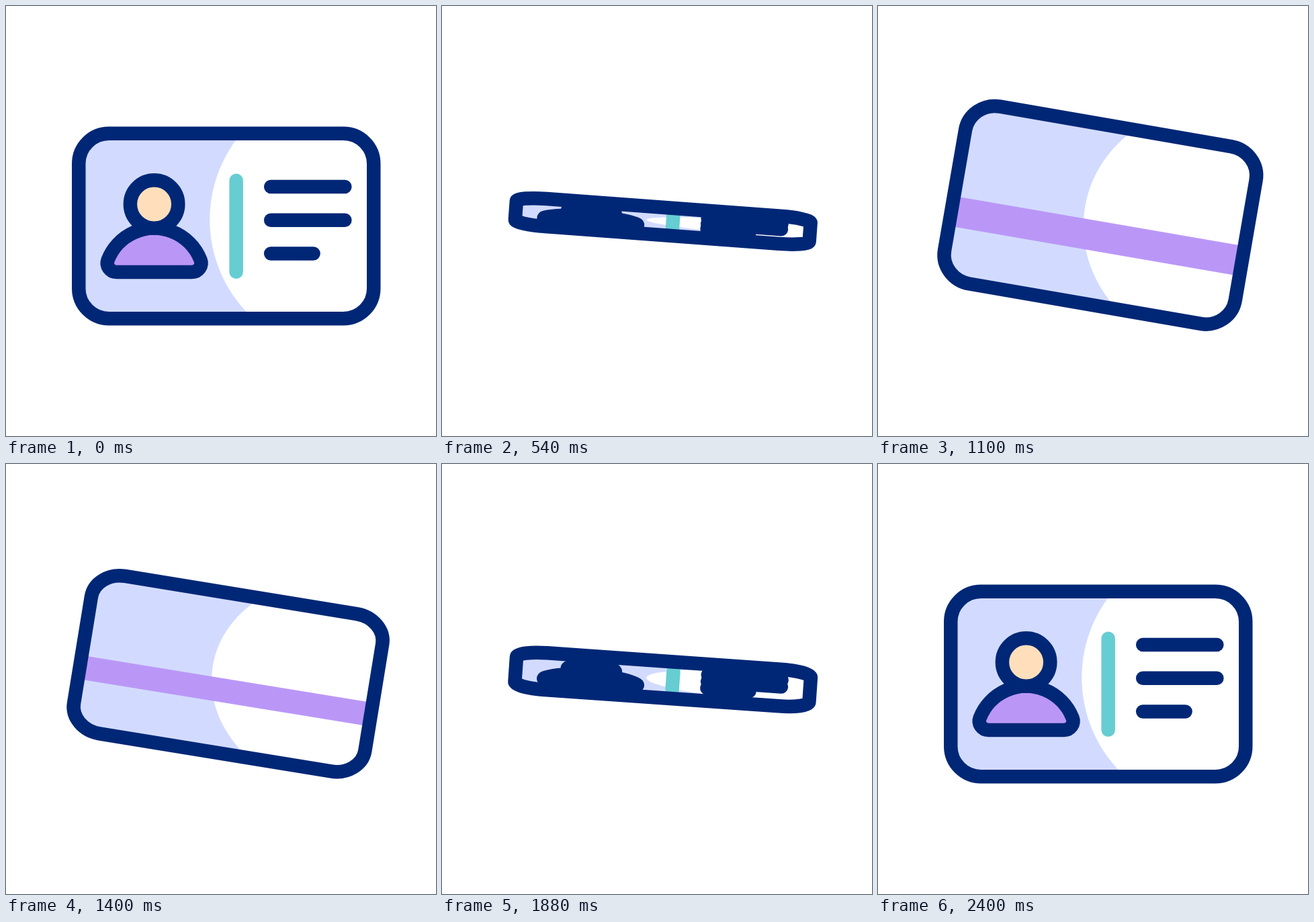
Write an HTML page with a canvas that moves like this. It is 640 px wide and 640 px high and loops after 2620 ms.

```html
<!DOCTYPE html>
<html lang="en">
<head>
<meta charset="utf-8">
<title>ID card flip</title>
<style>
  html, body { margin: 0; width: 100%; height: 100%; overflow: hidden; background: #fff; }
  canvas { display: block; }
</style>
</head>
<body>
<canvas id="stage" width="640" height="640"></canvas>
<script>
const ctx = document.getElementById('stage').getContext('2d');

const NAVY = '#002776', LAVENDER = '#d2dbff', PURPLE = '#ba97f7',
      TEAL = '#66cdd3', SKIN = '#ffdfbb';
const LOOP = 2620, HALF = 1200, STEP = 20;
const LINE = 20.5;
const CARD = { x: 327.75, y: 327.5, width: 439, front: 275.5, back: 278.7, radius: 45 };
const PIVOT = { x: 423.7, y: 337.5 };
const MAX_TILT = 10 * Math.PI / 180;

const smooth = p => p * p * (3 - 2 * p);

// Builds a path squashed vertically; strokes stay at full width.
function squashed(scale, build) {
  ctx.save();
  ctx.scale(1, scale);
  ctx.beginPath();
  build();
  ctx.restore();
}

function stroke(color = NAVY) {
  ctx.strokeStyle = color;
  ctx.stroke();
}

function fill(color) {
  ctx.fillStyle = color;
  ctx.fill();
}

function line(scale, x1, y1, x2, y2, color) {
  squashed(scale, () => {
    ctx.moveTo(x1, y1);
    ctx.lineTo(x2, y2);
  });
  stroke(color);
}

function cardPath(scale, height) {
  squashed(scale, () =>
    ctx.roundRect(-CARD.width / 2, -height / 2, CARD.width, height, CARD.radius));
}

function paintInside(circleScale) {
  ctx.fillStyle = LAVENDER;
  ctx.fillRect(-240, -160, 480, 320);
  ctx.beginPath();
  ctx.ellipse(175.5, -9.5 * circleScale, 200, 200 * circleScale, 0, 0, Math.PI * 2);
  fill('#fff');
}

function drawPerson(scale) {
  const x = -107.15, spread = Math.asin(69 / 74), top = -Math.PI / 2;
  squashed(scale, () => {
    ctx.arc(x, 77.2, 74, top - spread, top + spread);
    ctx.bezierCurveTo(x + 72.3, 59, x + 66, 68.5, x + 56.2, 68.5);
    ctx.lineTo(x - 56.2, 68.5);
    ctx.bezierCurveTo(x - 66, 68.5, x - 72.3, 59, x - 69, 50.5);
    ctx.closePath();
  });
  fill(PURPLE);
  stroke();
  squashed(scale, () => ctx.arc(x, -32.5, 35.7, 0, Math.PI * 2));
  fill(SKIN);
  stroke();
}

function drawFront(scale) {
  drawPerson(scale);
  line(scale, 14.9, -67.8, 14.9, 68.3, TEAL);
  line(scale, 66.4, -58.5, 176.6, -58.5);
  line(scale, 66.4, -8.8, 176.6, -8.8);
  line(scale, 66.4, 41.1, 129.8, 41.1);
}

function drawBack(scale) {
  ctx.fillStyle = PURPLE;
  ctx.fillRect(-230, 9.3 * scale, 460, 49 * scale * scale);
}

function render(time) {
  const t = Math.min(Math.floor(time % LOOP / STEP) * STEP, 2 * HALF);
  const turn = smooth(1 - Math.abs(t - HALF) / HALF);
  const isFront = turn < 0.5;
  const scale = Math.max(Math.abs(1 - 2 * turn), 0.001);
  const height = isFront ? CARD.front : CARD.back;
  const circleScale = isFront ? 1.11 * scale - 0.11 : 1.012 * scale - 0.05;

  ctx.fillStyle = '#fff';
  ctx.fillRect(0, 0, 640, 640);
  ctx.save();
  ctx.lineWidth = LINE;
  ctx.lineCap = ctx.lineJoin = 'round';
  ctx.translate(PIVOT.x, PIVOT.y);
  ctx.rotate(MAX_TILT * turn);
  ctx.translate(CARD.x - PIVOT.x, CARD.y - PIVOT.y);

  ctx.save();
  cardPath(scale, height);
  ctx.clip();
  paintInside(Math.max(circleScale, 0));
  if (!isFront) drawBack(scale);
  ctx.restore();

  if (isFront) drawFront(scale);
  cardPath(scale, height);
  stroke();
  ctx.restore();
}

const start = performance.now();
function tick() {
  render(performance.now() - start);
  requestAnimationFrame(tick);
}
tick();
</script>
</body>
</html>
```
